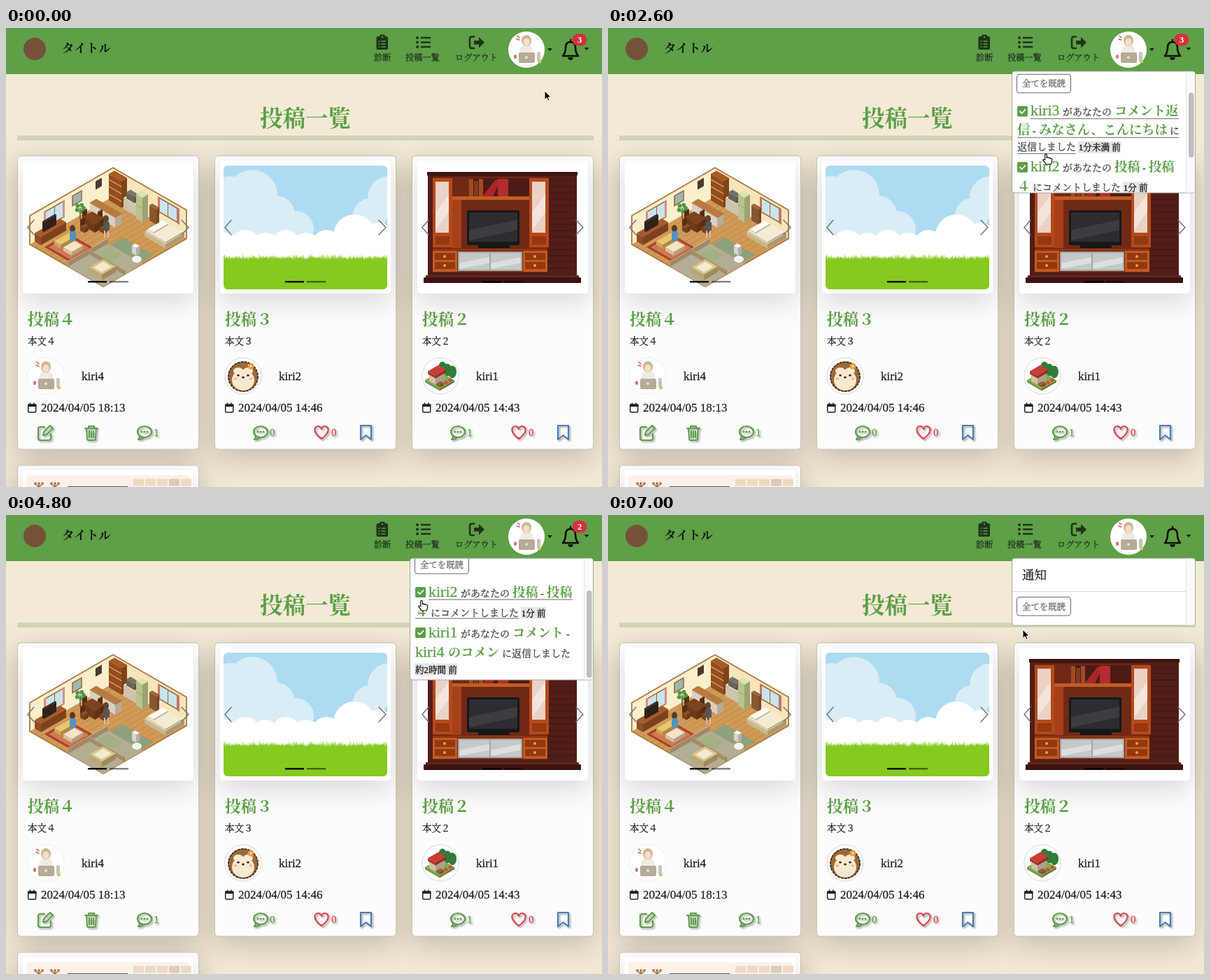
Recreate the animation shown at these times as an HTML page. Size 852x657 px, loop 7100 ms.

```html
<!DOCTYPE html>
<html lang="ja">
<head>
<meta charset="utf-8">
<title>投稿一覧</title>
<style>
html, body { margin: 0; width: 100%; height: 100%; overflow: hidden; background: #f3ead5; }
svg { display: block; width: 852px; height: 657px; }
text { font-family: 'Liberation Serif', 'Noto Serif CJK JP', 'Noto Sans CJK JP', serif; white-space: pre; stroke-width: .28px; }
.bold { font-weight: 600; stroke: none; }
.line { fill: none; stroke-linejoin: round; stroke-linecap: round; }
.card { filter: drop-shadow(0 14px 21px rgba(0,0,0,.19)); }
.photo { filter: drop-shadow(0 14px 18px rgba(0,0,0,.13)); }
.icons { filter: drop-shadow(2px 2px 1px rgba(0,0,0,.32)); }
</style>
</head>
<body>
<svg id="stage" viewBox="0 0 852 657"></svg>
<script>
const GREEN = '#5c9f47', LEAF = '#5e9f47', INK = '#222', NAV = '#1f341a', RED = '#dc444b', BLUE = '#4b7bb3';
const USERS = ['kiri1', 'kiri2', 'kiri3', 'kiri4'];

const text = (x, y, size, str, fill = INK, extra = '') =>
  `<text x="${x}" y="${y}" font-size="${size}" fill="${fill}" stroke="${fill}" ${extra}>${str}</text>`;
const bold = (x, y, size, str, fill = GREEN, extra = '') => text(x, y, size, str, fill, 'class="bold" ' + extra);
const rect = (x, y, w, h, fill, r = 0, extra = '') =>
  `<rect x="${x}" y="${y}" width="${w}" height="${h}" rx="${r}" fill="${fill}" ${extra}/>`;
const poly = (points, fill, extra = '') => `<polygon points="${points}" fill="${fill}" ${extra}/>`;
const disc = (x, y, r, fill, ry = r, extra = '') =>
  `<ellipse cx="${x}" cy="${y}" rx="${r}" ry="${ry}" fill="${fill}" ${extra}/>`;
const path = (d, fill, extra = '') => `<path d="${d}" fill="${fill}" ${extra}/>`;
const line = (d, color, width = 2.2) => `<path class="line" d="${d}" stroke="${color}" stroke-width="${width}"/>`;
const at = (x, y, body) => `<g transform="translate(${x} ${y})">${body}</g>`;
const each = (list, fn) => list.map(fn).join('');
const range = (from, to, step = 1) => Array.from({ length: Math.ceil((to - from) / step) }, (_, i) => from + i * step);

// Isometric drawing: u runs right, v runs left, z up
const iso = (u, v, z = 0) => [153 + u - v, 241 + .577 * (u + v) - z];
const leftWall = (v, z, w, h, fill, extra) => poly([iso(0, v, z), iso(0, v + w, z), iso(0, v + w, z + h), iso(0, v, z + h)].join(' '), fill, extra);
const rightWall = (u, z, w, h, fill, extra) => poly([iso(u, 0, z), iso(u + w, 0, z), iso(u + w, 0, z + h), iso(u, 0, z + h)].join(' '), fill, extra);
function box(u, v, w, d, h, color, z = 0) {
  const p = (i, j, k) => iso(u + w * i, v + d * j, z + h * k);
  const face = (...corners) => corners.join(' ');
  const left = face(p(0, 1, 0), p(1, 1, 0), p(1, 1, 1), p(0, 1, 1));
  const right = face(p(1, 0, 0), p(1, 1, 0), p(1, 1, 1), p(1, 0, 1));
  return poly(face(p(0, 0, 1), p(1, 0, 1), p(1, 1, 1), p(0, 1, 1)), color) +
    poly(left, color) + poly(left, 'rgba(40,15,0,.16)') + poly(right, color) + poly(right, 'rgba(40,15,0,.32)');
}

// Avatars, centred on 0,0
const ring = '<circle r="26" fill="#fff" stroke="#ddd"/>';
const worker = disc(0, 0, 26, '#fff') +
  path('M-10 8Q-11 -7 0 -7Q11 -7 10 8Z', '#f0ebe2') +
  disc(0, -13, 7, '#cdb791', 8) + disc(0, -11, 4.6, '#f4dfc9', 5.5) +
  line('M-13 -20l3 3M-14 -15l4 1', '#d5525a', 1.3) +
  rect(-11, 4, 23, 15, '#b5ab98', 2) + disc(0, 11, 2, '#e9e2d5') +
  rect(15, 3, 5, 14, '#c8c4ba', 2) + rect(16, 15, 5, 4, '#d9c665', 1) + disc(-16, 10, 2, '#c97b78', 3);
const hedgehog = ring +
  disc(0, 1, 21, '#9b6a3c', 21, 'stroke="#4d3320" stroke-width="2" stroke-dasharray="4 1"') +
  disc(0, 6, 16, '#f8e8cf', 15) +
  each([-1, 1], s => disc(s * 7, -1, 1.8, '#33241a') + disc(s * 11, 4, 2.5, '#f2b796', 1.7) + disc(s * 7, -7, 7, '#f8e8cf', 5)) +
  disc(0, 2, 2, '#4a3021', 1.5) + disc(11, -14, 4.5, '#ee9b3f') + disc(11, -14, 1.6, '#fbe29c');
const garden = ring + at(-154, -247,
  each([4, 11, 18], u => disc(153 + u, 234 + u * .4, 6, '#2f7d3a', 9)) +
  box(0, 0, 21, 21, 3, '#7fae4c', -3) + box(4, 6, 9, 13, 10, '#f1e4cf') + box(3, 5, 11, 15, 4, '#c93d34', 10) +
  each([3, 9, 15], n => disc(...iso(18, n), 2.6, n % 2 ? '#d9463f' : '#3a8a3b')) + box(14, 13, 5, 6, 2, '#8f6243'));

// Pictures
function room() {
  const edge = 'stroke="#96643b" stroke-width="1.5"';
  const person = (x, y, shirt, hair) => disc(x, y, 4, hair, 5) + rect(x - 4, y + 4, 9, 14, shirt, 3);
  const chair = (u, v) => box(u, v, 6, 6, 7, '#8a4f26') + box(u, v, 1, 6, 9, '#6d3a19', 7);
  const plank = u => line(`M${iso(u, 0)}L${iso(u, 119)}`, '#b5793a', .6);
  return leftWall(0, 0, 119, 41, '#fbefcb') + rightWall(0, 0, 105, 41, '#f6e5ba') +
    box(0, 0, 105, 119, 0, '#cf9a58') + each(range(7, 105, 7), plank) +
    line(`M${iso(0, 119)}L${iso(0, 119, 41)}L${iso(0, 0, 41)}L${iso(105, 0, 41)}L${iso(105, 0)}L${iso(105, 119)}Z`, '#ad7942', 1.8) +
    leftWall(71, 11, 26, 23, '#cbe3ea', edge) + leftWall(83, 11, 1, 23, '#96643b') + leftWall(45, 20, 13, 14, '#9fb7ae', edge) +
    rightWall(66, 16, 26, 20, '#cbe3ea', edge) + rightWall(78, 16, 1, 20, '#96643b') +
    each([69, 96], v => leftWall(v, 10, 3, 25, '#d78f8a')) + each([64, 92], u => rightWall(u, 14, 3, 23, '#c7756d')) +
    leftWall(16, 24, 9, 12, '#4c3b2c') +
    box(2, 0, 18, 8, 38, '#a85a25') + each([9, 20, 30], z => line(`M${iso(2, 8, z)}L${iso(20, 8, z)}`, '#dc9c55', 1.4)) +
    box(23, 0, 18, 8, 16, '#efe6cf') + box(26, 1, 12, 6, 9, '#77736b', 16) +
    box(44, 3, 9, 8, 35, '#d6e6aa') + line(`M${iso(44, 11, 20)}L${iso(53, 11, 20)}`, '#94a66c', 1) +
    box(56, 0, 10, 4, 22, '#9b6639') + box(72, 0, 30, 27, 6, '#e9d9ae') + box(73, 1, 28, 25, 2, '#f4ecd2', 6) + box(74, 3, 8, 21, 2, '#fffaf0', 8) +
    box(4, 28, 36, 9, 14, '#fbf5e4') + box(4, 28, 36, 9, 1, '#b97a40', 14) +
    line(`M${iso(5, 52)}v-16`, '#6b5132', 1.5) + each(range(0, 5), i => disc(106 + 5 * Math.cos(i * 1.3), 258 + 5 * Math.sin(i * 1.3), 3, '#4a9a46')) +
    chair(10, 48) + chair(22, 38) + box(14, 44, 18, 14, 12, '#7b431f') + chair(19, 60) + chair(34, 47) +
    box(0, 76, 9, 36, 12, '#a85a2a') + box(3, 86, 2, 18, 14, '#332b27', 12) +
    box(14, 78, 36, 34, 0, '#a9402a') + box(17, 81, 30, 28, 0, '#cf7a4f') +
    box(18, 80, 9, 22, 5, '#e9c56f') + person(95, 287, '#4f94c0', '#593b22') + box(32, 87, 12, 16, 5, '#f3e5c5') +
    person(143, 273, '#55555a', '#64402a') + line('M141 291v8M146 291v8', '#e5bd9b', 2) +
    box(55, 62, 50, 57, 0, '#b3ad93') + box(58, 44, 44, 18, 0, '#8fa17a') + box(60, 66, 20, 22, 0, '#a3b083') +
    box(54, 62, 1, 57, 7, '#d8c49a') + box(55, 88, 50, 1, 6, '#bda478') +
    box(78, 92, 18, 20, 8, '#d8c48c') + box(81, 95, 12, 14, 0, '#f4ead0', 8) +
    box(84, 52, 6, 5, 11, '#fbfaf6') + disc(187, 331, 7, '#f4f2ec', 5);
}

function meadow() {
  let seed = 7;
  const rnd = () => (seed = seed * 16807 % 2147483647) / 2147483647;
  const blade = x => `L${x + 1.2} ${323 + rnd() * 5}L${x + 2.4} ${329 + rnd() * 3}`;
  const puffs = (fill, ...list) => each(list, c => disc(...c, fill));
  const haze = '#d9edf7';
  return '<clipPath id="sky"><rect x="29" y="197" width="234" height="177" rx="6"/></clipPath><g clip-path="url(#sky)">' +
    rect(29, 197, 234, 177, '#aedbf1') +
    puffs(haze, [38, 240, 28], [70, 239, 36], [104, 267, 27], [132, 288, 26], [266, 243, 31], [238, 268, 24]) +
    rect(29, 250, 75, 80, haze) + rect(29, 296, 234, 40, haze) +
    each(range(0, 9), i => disc(31 + i * 29, 313 - 4 * (i % 2), 20, '#fff')) + puffs('#fff', [216, 297, 30], [250, 302, 23]) +
    rect(29, 313, 234, 30, '#fff') + path('M29 374V329' + each(range(29, 263, 2.4), blade) + 'L263 374Z', '#85ca20') + '</g>';
}

function cabinet() {
  const pane = (x, y, w, h, fill) => rect(x, y, w, h, fill) +
    poly(`${x},${y + h * .6} ${x + w},${y + h * .25} ${x + w},${y + h * .6} ${x},${y + h * .95}`, 'rgba(255,255,255,.4)');
  const door = x => rect(x, 215, 28, 99, '#b5491b') + pane(x + 4, 220, 19, 73, '#ead2c5') + rect(x + 4, 298, 20, 12, '#95380f');
  const drawer = x => rect(x, 319, 35, 30, '#c25a22') +
    each([322, 335], y => rect(x + 3, y, 29, 10, '#92390f') + disc(x + 17, y + 5, 2, '#e9a25b'));
  const book = i => rect(98 + i * 7, 216 + i % 2 * 3, 6, 25 - i % 2 * 3, i % 2 ? '#7e3b22' : '#a24a21');
  return rect(39, 209, 213, 150, '#501d18') + rect(38, 206, 215, 5, '#3d1413') +
    each(range(218, 352, 9), y => line(`M212 ${y}h36`, '#3b1412', .8)) +
    rect(46, 213, 164, 137, '#702915') + rect(98, 215, 86, 27, '#4b1b15') + each(range(0, 3), book) +
    poly('117,241 136,217 144,217 132,241', '#a9262a') + rect(139, 216, 15, 25, '#b32c30') +
    rect(74, 241, 111, 5, '#c25c24') + rect(74, 246, 13, 69, '#a64018') + door(46) + door(184) +
    rect(95, 261, 75, 50, '#17181a', 2) + pane(98, 264, 69, 42, '#2b2d30').replace('.4)', '.08)') + rect(111, 311, 45, 4, '#151515', 1) +
    rect(46, 316, 164, 3, '#8d3513') + drawer(46) + drawer(175) + rect(82, 320, 92, 28, '#a5a5a5') +
    each([84, 129], x => pane(x, 322, 43, 24, '#c6c9c9')) +
    rect(36, 354, 219, 5, '#61261c') + rect(33, 357, 225, 8, '#3c1312', 1);
}

// Card pieces, all in the first column's coordinates
const comment = (x, n) => at(x, 579, disc(0, -1, 10, 'none', 8, `stroke="${GREEN}" stroke-width="2.2"`) +
  line('M-7 5Q-7 8 -9 10Q-4 10 -1 7', GREEN) + each([-4, 0, 4], d => disc(d, -1, 1.4, GREEN)) + text(13, 5, 15, n, GREEN));
const own = line('M55 571H49Q46 571 46 574V587Q46 590 49 590H61Q64 590 64 587V581M53 583L54 578L63 569L67 573L58 582Z', GREEN) +
  line('M113 573H131M118 573V570H126V573M115 573L116 588Q116 590 118 590H126Q128 590 128 588L129 573M119 577V586M122 577V586M125 577V586', GREEN, 2);
const social = at(169, 579, line('M0 9C-14 -1 -10 -9 -5 -9Q-1 -9 0 -5Q1 -9 5 -9C10 -9 14 -1 0 9Z', RED) + text(14, 5, 15, '0', RED)) +
  line('M225 569H240V589L232.5 583L225 589Z', BLUE);
const calendar = rect(31.7, 539, 11, 11, 'none', 1.5, 'stroke="#222" stroke-width="1.5"') +
  rect(31, 538.5, 12.5, 3.5, INK) + line('M34.5 537v2M40 537v2', INK, 1.6);
const slider = line('M40 275L31 285.5L40 296M251 275L261 285.5L251 296', '#75757a', 1.5) +
  rect(117, 362, 27, 2.4, '#000') + rect(148, 362, 27, 2.4, '#000', 0, 'opacity=".5"');

const shell = (x, y) => rect(x + .5, y, 259, 420, '#fcfcfc', 5, 'stroke="#c9c5ba"');
const photo = y => rect(24, y, 244, 190, '#fff', 5, 'class="photo"');
const card = (i, n, picture, avatar, user, time, icons) => at(i * 282, 0,
  photo(190) + picture + slider + bold(31, 425, 22.6, '投稿' + n) + text(31, 453, 13.4, '本文' + n) +
  at(57, 498, ring + avatar) + text(108, 504, 17, user) + calendar + text(50, 549, 17, '2024/04/05 ' + time) +
  `<g class="icons">${icons}</g>`);

const flower = x => line(`M${x} 660v-8M${x - 6} 652l6 5l6 -5`, '#9c6b45', 1.5) + each([-5, 0, 5], d => disc(x + d, 652, 1.9, '#b07a50'));
const swatch = i => rect(182 + i * 17, 645.5, 15, 10, i === 3 ? '#dccbb8' : '#eedac2');
const lastCard = photo(633) + rect(29, 640, 234, 40, '#fbf1e8', 5) + flower(47) + flower(70) +
  rect(88, 656, 86, 1, '#5d5149') + each(range(0, 5), swatch);

const label = (x, str) => text(x, 47, 12.2, str, NAV);
const caret = (x, y) => poly(`${x},${y} ${x + 7},${y} ${x + 3.5},${y + 4}`, '#14210f');
const header = rect(0, 0, 852, 66, LEAF) + disc(41, 30, 16, '#76513a') + bold(80, 35, 17.5, 'タイトル', '#10180c') +
  rect(529.5, 12, 16.5, 19, NAV, 2) + rect(534, 9.5, 8, 5, NAV, 2) + disc(538, 13, 1.2, LEAF) +
  each([19, 23, 27], y => line(`M533 ${y}h1M537 ${y}h5`, LEAF, 1.4)) +
  each([14, 20.5, 27], y => disc(588, y, 2, NAV) + line(`M594 ${y}h12`, NAV, 2.6)) +
  line('M669 12.5H666Q663 12.5 663 15.5V26Q663 29 666 29H669', NAV, 2.6) + rect(669, 18, 8, 5.5, NAV) + poly('676,13 684,20.7 676,28.5', NAV) +
  label(526, '診断') + label(571, '投稿一覧') + label(642, 'ログアウト') + at(744, 31, worker) + caret(774, 29) + caret(826.5, 28) +
  line('M796 40Q800 35 800 28Q800 20 807 20Q814 20 814 28Q814 35 818 40ZM807 17v2', '#0c120a', 2.6) + path('M803 42H811Q810 46 807 46Q804 46 803 42Z', '#0c120a');
const badge = `<g id="badge">${rect(809.5, 8, 21, 17.5, '#d2323f', 8.75)}${bold(820, 21, 12.5, '3', '#fff', 'id="count" text-anchor="middle"')}</g>`;

// Notifications; each item's origin is the centre of its first line
const link = (x, y, str) => bold(x, y, 18.3, str);
const small = (x, y, str) => text(x, y, 14, str, '#3c4043');
const name = (x, y, i) => text(x, y, 22, USERS[i], GREEN);
const ago = (x, y, w, str) => rect(x - 1, y - 13, w + 2, 17, '#e5e5e5') + text(x, y, 12.6, str, '#111');
const item = (user, body, rules) => '<g class="item">' + rect(585, -7.5, 15, 15, GREEN, 2, 'class="box"') +
  line('M589 0L591.5 2.7L596.5 -2.5', '#fff', 1.8) + name(604, 6, user) + small(650, 6, 'があなたの') + body +
  `<path class="rule" d="${rules}" stroke="#666"/></g>`;
const items =
  item(2, link(724, 6, 'コメント返') + link(585, 33, '信') + small(607, 33, '-') + link(616, 33, 'みなさん、こんにちは') + small(803, 33, 'に') +
    small(585, 56, '返信しました') + ago(673, 56, 59, '1分未満 前'), 'M604 10.5H816M585 37.5H816M585 60.5H669') +
  item(1, link(724, 6, '投稿') + small(764, 6, '-') + link(773, 6, '投稿') + link(585, 34, '４') + small(607, 34, 'にコメントしました') +
    ago(737, 34, 34, '1分 前'), 'M604 10.5H810M585 37.5H733') +
  item(0, link(724, 6, 'コメント') + small(801, 6, '-') + name(585, 34, 3) + link(632, 34, 'のコメン') + small(709, 34, 'に返信しました') +
    ago(585, 57, 59, '約2時間 前'), 'M604 10.5H806M585 38.5H806');
const menu = '<clipPath id="view"><rect id="viewRect" x="578" y="62.5" width="261" height="173" rx="3"/></clipPath><g id="menu">' +
  rect(577.5, 62, 262, 174, '#fff', 4, 'id="panel" stroke="#a3a99a"') + '<g clip-path="url(#view)"><g id="list">' +
  text(592, 92, 17.5, '通知') + rect(577, 109, 250, 1, '#d5d5d5') +
  rect(584.5, 117.5, 77, 26.5, '#6c757d', 3.5, 'id="button" stroke="#62696f"') +
  text(592, 135.5, 12.4, '全てを既読', '#5f666c', 'id="caption"') + items +
  '</g>' + rect(826.5, 62, 14, 176, '#fafafa', 0, 'stroke="#e4e4e4"') + rect(830, 65, 7.5, 91, '#bebebe', 3.75, 'id="thumb"') + '</g></g>';

const pointer = '<g id="pointer">' +
  path('M0 0V12.5L3 9.8L5 14.2L7 13.3L5.1 9H9Z', '#000', 'id="arrow" stroke="#fff"') +
  path('M-1.3 1Q0 -.5 1.3 1V5.5Q3 4.5 4 6Q6 5 6.7 6.8Q9 6.3 8.8 8.5Q8.8 12 7 15H0Q-2 11 -4.3 9.2Q-4 7 -1.3 8.6Z', '#fff', 'id="hand" stroke="#000" stroke-width="1.1"') + '</g>';

const columns = [16, 298, 580];
stage.innerHTML = rect(0, 0, 852, 657, '#f3ead5') +
  each(columns, x => `<g class="card">${shell(x, 183)}</g>`) + `<g class="card">${shell(16, 626)}</g>` +
  each(columns, x => shell(x, 183)) + bold(363, 141, 32.5, '投稿一覧') + rect(16, 154, 824, 7, '#d0d5b3') +
  card(0, '４', room(), worker, USERS[3], '18:13', own + comment(198, 1)) +
  card(1, '３', meadow(), hedgehog, USERS[1], '14:46', comment(82, 0) + social) +
  card(2, '２', cabinet(), garden, USERS[0], '14:43', comment(82, 1) + social) +
  lastCard + header + badge + menu + pointer;

// Timeline: the pointer leaves for each stop at the given time
const LOOP = 7100, STEP = 100, GLIDE = 400;
const START = [770, 90];
const STOPS = [[300, 807, 35], [1300, 626, 180], [2600, 594, 117], [3900, 594, 122], [4800, 594, 116], [5300, 598, 161], [6400, 593, 164]];
const READ_AT = [3800, 5300, 6300], HEIGHTS = [80, 58, 80];
const $ = id => document.getElementById(id);
const set = (el, attrs) => Object.entries(attrs).forEach(([k, v]) => el.setAttribute(k, v));
const show = (el, on) => el.setAttribute('visibility', on ? 'inherit' : 'hidden');
const within = (t, a, b) => t >= a && t < b;
const rows = [...document.querySelectorAll('.item')];

function ease(t, start, length) {
  const u = Math.min(1, Math.max(0, (t - start) / length));
  return u * u * (3 - 2 * u);
}

function pointerAt(t) {
  return STOPS.reduce(([px, py], [start, x, y]) => {
    const u = ease(t, start, GLIDE);
    return [px + (x - px) * u, py + (y - py) * u];
  }, START);
}

function draw(now) {
  const t = Math.floor(now % LOOP / STEP) * STEP;
  const read = READ_AT.filter(time => t >= time).length;
  const content = 96 + HEIGHTS.slice(read).reduce((a, b) => a + b, 0);
  const view = Math.min(174, content);
  const scroll = Math.min(26 * ease(t, 1700, 300) + 34 * ease(t, 2400, 300), content - view);
  const checked = [within(t, 3000, 3800), within(t, 5100, 5300), within(t, 5600, 6300)];
  const linked = [within(t, 1700, 3000), within(t, 4100, 5100), false];

  show($('menu'), t >= 1000);
  set($('panel'), { height: view });
  set($('viewRect'), { height: view - 1 });
  set($('list'), { transform: `translate(0 ${-scroll})` });
  set($('thumb'), { y: 65 + scroll * 168 / content, height: 168 * view / content });
  show($('thumb'), content > view);

  let y = 170.5;
  rows.forEach((row, i) => {
    const unread = i >= read;
    show(row, unread);
    set(row, { transform: `translate(0 ${y})` });
    if (unread) y += HEIGHTS[i];
    set(row.querySelector('.box'), { fill: checked[i] ? '#3b6c2f' : GREEN });
    show(row.querySelector('.rule'), linked[i] && unread);
  });

  // The button is hovered briefly while the list closes up, then fades
  const hover = t < 5300 ? 0 : 1 - ease(t, 5500, 300);
  const ink = hover > .5 ? '#fff' : hover ? '#82898e' : '#5f666c';
  set($('button'), { 'fill-opacity': hover });
  set($('caption'), { fill: ink, stroke: ink });

  $('count').textContent = 3 - read;
  show($('badge'), read < 3);
  const hand = within(t, 1700, 6300);
  show($('hand'), hand);
  show($('arrow'), !hand);
  set($('pointer'), { transform: `translate(${pointerAt(t)})` });
  requestAnimationFrame(draw);
}
draw(0);
</script>
</body>
</html>
```
